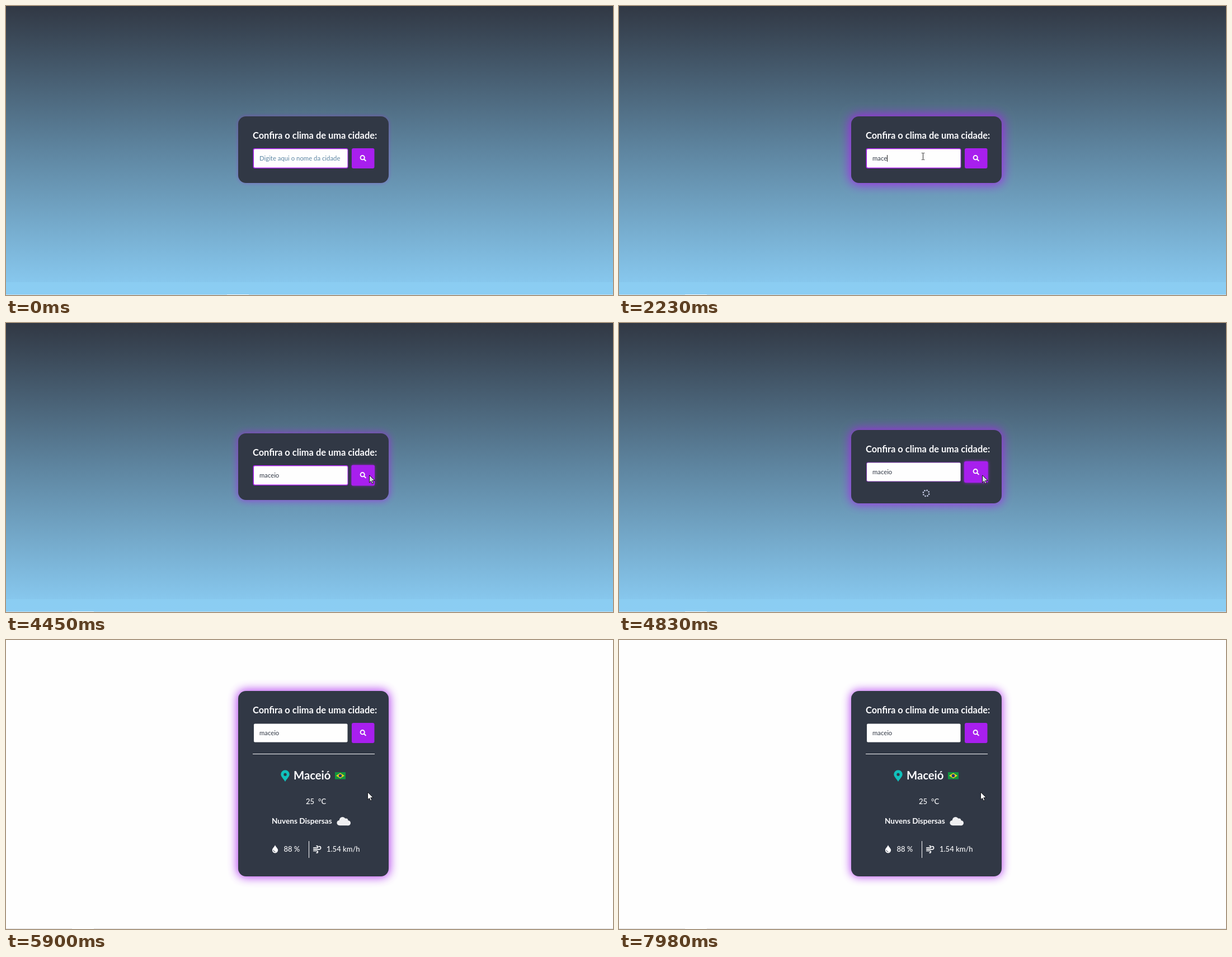
An HTML page with a canvas that plays this animation: 1085x516 px, repeating every 8000 ms.

```html
<!DOCTYPE html>
<html lang="pt-BR">
<head>
<meta charset="utf-8">
<title>Clima</title>
<style>
  html, body { margin: 0; width: 100%; height: 100%; overflow: hidden; background: #fefefe; }
  canvas { display: block; width: 1085px; height: 516px; }
</style>
</head>
<body>
<canvas id="stage" width="1085" height="516"></canvas>
<script>
const W = 1085, H = 516, LOOP = 8000;
const ctx = document.getElementById('stage').getContext('2d');
const CARD = '#313845', PURPLE = '#a81fee', WHITE = '#fbfbfd';
const LEFT = 415, WIDTH = 269;
const LOADING = 4600, LOADED = 4850, FLAG = 5350;

const clamp = v => Math.max(0, Math.min(1, v));
const ramp = (t, a, b) => clamp((t - a) / (b - a));
const smooth = p => p * p * (3 - 2 * p);

function rect(x, y, w, h, r, fill) {
  ctx.beginPath();
  ctx.roundRect(x, y, w, h, r);
  ctx.fillStyle = fill;
  ctx.fill();
}

function text(str, x, y, size, weight = 400, color = WHITE) {
  ctx.font = `${weight} ${size}px Lato, "Open Sans", sans-serif`;
  ctx.fillStyle = color;
  ctx.fillText(str, x, y);
  return ctx.measureText(str).width;
}

function circle(x, y, r, fill) {
  ctx.beginPath();
  ctx.arc(x, y, r, 0, Math.PI * 2);
  ctx.fillStyle = fill;
  ctx.fill();
}

function polygon(points, fill, stroke) {
  ctx.beginPath();
  points.forEach(([x, y]) => ctx.lineTo(x, y));
  ctx.closePath();
  ctx.fillStyle = fill;
  ctx.fill();
  if (stroke) {
    ctx.strokeStyle = stroke;
    ctx.lineWidth = 1;
    ctx.stroke();
  }
}

function background(t) {
  if (t >= LOADED) {
    ctx.fillStyle = '#fefefe';
    ctx.fillRect(0, 0, W, H);
    ctx.fillStyle = '#dcdcde';
  } else {
    const g = ctx.createLinearGradient(0, 0, 0, H);
    g.addColorStop(0, '#313844');
    g.addColorStop(0.5, '#5e85a0');
    g.addColorStop(0.955, '#87c7ed');
    g.addColorStop(0.956, '#8bcdf2');
    g.addColorStop(1, '#8bcdf3');
    ctx.fillStyle = g;
    ctx.fillRect(0, 0, W, H);
    ctx.fillStyle = '#c3e0f2';
  }
  ctx.fillRect(0, 515, W, 1);
  ctx.fillStyle = '#f6fafc';
  ctx.fillRect(t < 60 ? 395 : 118, 515, 39, 1);
}

function glow(t, y, h) {
  const g = Math.abs(Math.sin(Math.PI * (t - 350) / 3340));
  if (g < 0.02) return;
  const s = 2 * g, away = 3000;
  ctx.save();
  ctx.shadowColor = `rgba(168, 32, 240, ${g})`;
  ctx.shadowBlur = 20 * g;
  ctx.shadowOffsetX = away;
  rect(LEFT - s - away, y - s, WIDTH + 2 * s, h + 2 * s, 15, '#000');
  ctx.restore();
}

const KEYS = [1700, 1880, 2050, 2200, 2700, 2950];

function field(t, top) {
  const focus = 1 - ramp(t, 4560, 4700);
  const rest = 1 - ramp(t, LOADED, 5350);
  if (rest > 0) {
    const edge = focus > 0 ? PURPLE : `rgba(120, 50, 170, ${rest})`;
    const thin = 0.5 * (1 - focus);
    rect(441.5 + thin, top + 57 + thin, 170 - 2 * thin, 36 - 2 * thin, 3, edge);
  }
  rect(443, top + 58.5, 167.5, 33, 2, '#fefefe');

  const count = KEYS.filter(k => t >= k).length;
  const typed = 'maceio'.slice(0, count);
  const base = top + 79;
  const w = count
    ? text(typed, 453, base, 11.3, 400, '#313845')
    : (text('Digite aqui o nome da cidade', 453, base, 11.35, 400, '#5c86a3'), 0);
  const since = t - (count ? KEYS[count - 1] : 1200);
  if (since >= 0 && t < 4500 && since % 1000 < 500) {
    ctx.fillStyle = '#222';
    ctx.fillRect(Math.round(453 + w), top + 69, 1, 12);
  }
}

function button(t, top) {
  const hover = ramp(t, 4380, 4500) * (1 - ramp(t, LOADED, 5350));
  ctx.save();
  ctx.shadowColor = `rgba(168, 31, 238, ${hover})`;
  ctx.shadowBlur = 5;
  rect(618 - hover, top + 57 - hover, 40.5 + 2 * hover, 36 + 2 * hover, 3, PURPLE);
  ctx.restore();
  ctx.strokeStyle = WHITE;
  ctx.lineCap = 'round';
  ctx.lineWidth = 2;
  ctx.beginPath();
  ctx.arc(637.2, top + 73.7, 3.6, 0, Math.PI * 2);
  ctx.moveTo(640.2, top + 76.7);
  ctx.lineTo(642.8, top + 79.3);
  ctx.stroke();
}

function spinner(t) {
  for (let i = 0; i < 8; i++) {
    const a = i * Math.PI / 4 + Math.floor((t - LOADING) / 60) * 0.36;
    circle(549 + 5.3 * Math.cos(a), 304 + 5.3 * Math.sin(a), 1.35, '#c5cbe6');
  }
}

function pin(x) {
  ctx.beginPath();
  ctx.moveTo(x, 253);
  ctx.bezierCurveTo(x - 2, 249, x - 7.7, 244, x - 7.7, 240);
  ctx.arc(x, 240, 7.7, Math.PI, 0);
  ctx.bezierCurveTo(x + 7.7, 244, x + 2, 249, x, 253);
  ctx.fillStyle = '#10c1bc';
  ctx.fill();
  circle(x, 240.2, 2.6, CARD);
}

function flag() {
  rect(588, 236, 19, 12.5, 0, '#119540');
  polygon([[590, 242.2], [597.5, 237.5], [605, 242.2], [597.5, 247]], '#f2d21c');
  circle(597.5, 242.2, 2.8, '#23327e');
}

function cloud() {
  const c = '#efeff1';
  circle(596, 326.5, 4.6, c);
  circle(601.5, 321.8, 5.8, c);
  circle(607.5, 322.5, 4, c);
  circle(611.5, 326.7, 4.5, c);
  rect(596, 323, 15.5, 8.2, 0, c);
}

function drop() {
  ctx.beginPath();
  ctx.moveTo(481, 366);
  ctx.bezierCurveTo(482.5, 370, 486.2, 372, 486.2, 375.3);
  ctx.arc(481, 375.3, 5.1, 0, Math.PI);
  ctx.bezierCurveTo(475.8, 372, 479.5, 370, 481, 366);
  ctx.fillStyle = WHITE;
  ctx.fill();
  ctx.strokeStyle = CARD;
  ctx.lineWidth = 0.9;
  ctx.beginPath();
  ctx.arc(481, 375.2, 3, Math.PI / 2, Math.PI);
  ctx.stroke();
}

function wind() {
  ctx.strokeStyle = WHITE;
  ctx.lineWidth = 1.7;
  ctx.lineCap = 'round';
  ctx.beginPath();
  ctx.moveTo(549.8, 371.2);
  ctx.lineTo(555.6, 371.2);
  ctx.arc(555.6, 369.4, 1.8, Math.PI / 2, -Math.PI * 0.6, true);
  ctx.moveTo(549.8, 373.8);
  ctx.lineTo(560, 373.8);
  ctx.arc(560, 371.2, 2.6, Math.PI / 2, -Math.PI * 0.6, true);
  ctx.moveTo(549.8, 376.5);
  ctx.lineTo(555.6, 376.5);
  ctx.arc(555.6, 378.2, 1.7, -Math.PI / 2, Math.PI * 0.6);
  ctx.stroke();
}

function weather(t) {
  const shift = t >= FLAG ? -10 : 0;
  ctx.fillStyle = WHITE;
  ctx.fillRect(441, 203, 218, 1);
  ctx.fillRect(541, 359, 1, 30);
  pin(509 + shift);
  text('Maceió', 524 + shift, 249, 20.3, 700);
  if (shift) flag();
  text('25', 536, 293, 13, 500);
  text('°C', 558, 293, 13, 500);
  text('Nuvens Dispersas', 475, 328, 13.6, 700);
  cloud();
  drop();
  text('88 %', 496.5, 378, 13, 500);
  wind();
  text('1.54 km/h', 573, 378, 13, 500);
}

// Pointer stops: time, x, y
const PATH = [
  [60, 959, 516], [300, 857, 488], [780, 543, 268], [3590, 543, 268], [3690, 570, 333],
  [3920, 640, 484], [4220, 655, 355], [4380, 649, 272], [5350, 649, 272], [5400, 646, 272]
];

function pointerAt(t) {
  const i = PATH.findIndex(p => p[0] > t);
  if (i < 0) return PATH[PATH.length - 1].slice(1);
  const a = PATH[i - 1], b = PATH[i];
  const p = smooth(ramp(t, a[0], b[0]));
  return [a[1] + (b[1] - a[1]) * p, a[2] + (b[2] - a[2]) * p];
}

function beam(x, y, color) {
  ctx.fillStyle = color;
  ctx.fillRect(x, y - 5, 1, 11);
  for (const end of [y - 6, y + 6]) {
    ctx.fillRect(x - 2, end, 2, 1);
    ctx.fillRect(x + 1, end, 2, 1);
  }
}

function arrow(x, y, fill) {
  const shape = [[0, 0], [0, 13], [3, 10.3], [5, 15], [7.3, 14], [5.3, 9.5], [9.3, 9.3]];
  polygon(shape.map(([dx, dy]) => [x + 0.5 + dx, y + dy]), fill, '#15171c');
}

function pointer(t) {
  if (t < PATH[0][0]) return;
  const [x, y] = pointerAt(t).map(Math.round);
  const inField = x > 441 && x < 611 && y > 253 && y < 291;
  if (inField) beam(x, y, '#2b2b2b');
  else if (t > 3590 && t < 3760) beam(x, y, 'rgba(90, 100, 90, 0.4)');
  else arrow(x, y, t > 4380 && t < FLAG ? '#d3d7de' : '#fff');
}

function draw(t) {
  const [top, height] = t >= LOADED ? [91, 331] : t >= LOADING ? [191, 131] : [197, 119];
  background(t);
  glow(t, top, height);
  rect(LEFT, top, WIDTH, height, 14, CARD);
  text('Confira o clima de uma cidade:', 441, top + 40, 16.4, 700);
  field(t, top);
  button(t, top);
  if (t >= LOADED) weather(t);
  else if (t >= LOADING) spinner(t);
  pointer(t);
}

const start = performance.now();
function frame() {
  draw((performance.now() - start) % LOOP);
  requestAnimationFrame(frame);
}
frame();
</script>
</body>
</html>
```
